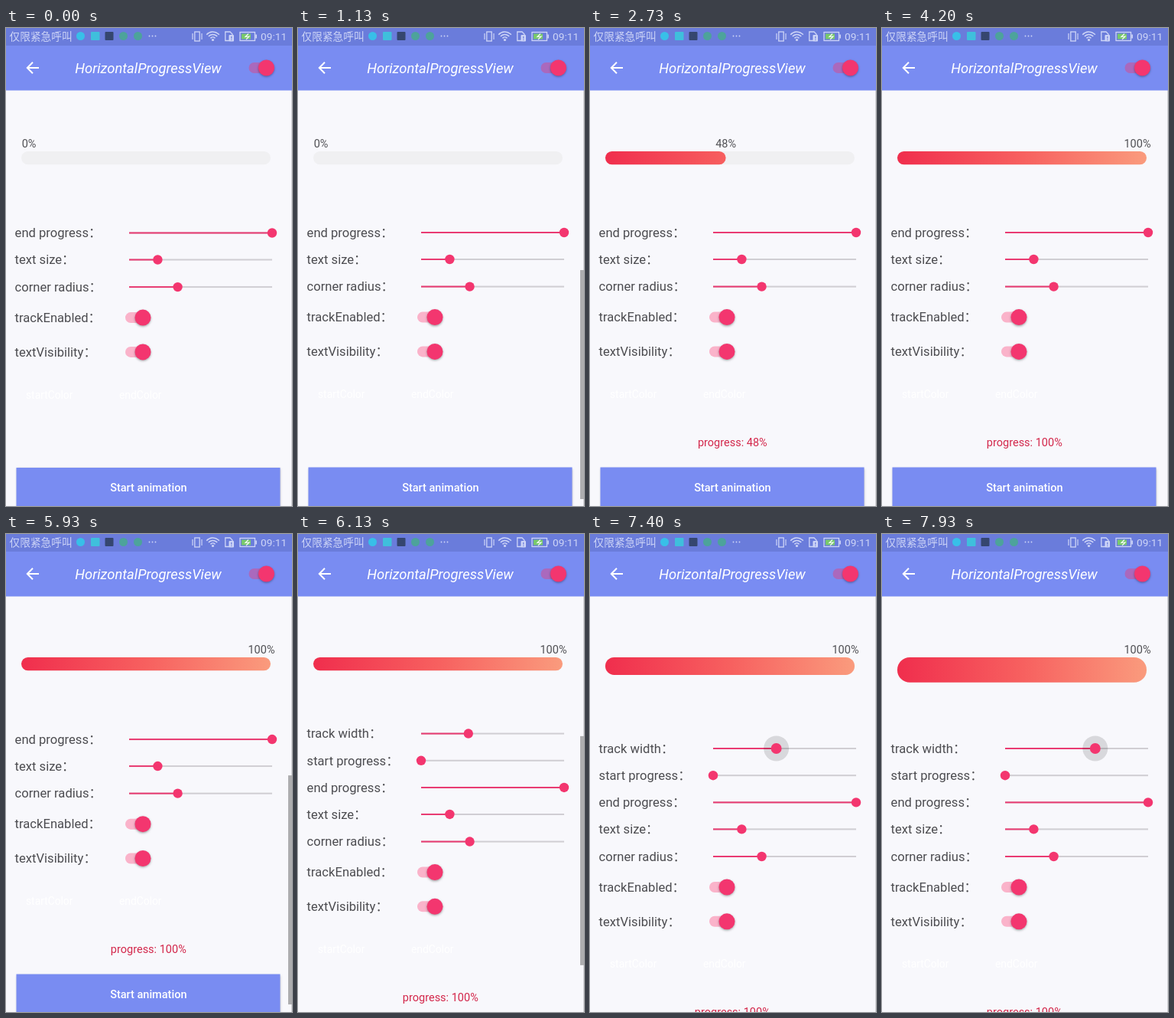
Animation of 374 by 624 pixels, one loop 8000 ms. Source, as an HTML page with a canvas:

```html
<!DOCTYPE html>
<html lang="zh-CN">
<head>
<meta charset="utf-8">
<title>HorizontalProgressView</title>
<style>
html, body { margin: 0; width: 100%; height: 100%; overflow: hidden; background: #f8f8fc; }
canvas { display: block; width: 374px; height: 624px; }
</style>
</head>
<body>
<canvas id="stage"></canvas>
<script>
const W = 374, H = 624, LOOP = 8000;
const PINK = '#f3366f', BLUE = '#798cf2', BG = '#f8f8fc';
const FONT = 'Roboto, "Noto Sans CJK SC", "Noto Sans CJK", sans-serif';
const BAR_X = 20, BAR_W = 326, BAR_Y = 161;
const LINE_X = 161, LINE_W = 187;
const LIST_TOP = 248, MAX_SCROLL = 83.4;

const canvas = document.getElementById('stage');
const ctx = canvas.getContext('2d');
const dpr = window.devicePixelRatio || 1;
canvas.width = W * dpr;
canvas.height = H * dpr;

const clamp = (v, a = 0, b = 1) => Math.min(b, Math.max(a, v));
const span = (t, a, b) => clamp((t - a) / (b - a));
const cosEase = u => 0.5 - 0.5 * Math.cos(Math.PI * u);
const cubicEase = u => u < 0.5 ? 4 * u ** 3 : 1 - 4 * (1 - u) ** 3;

function rect(x, y, w, h, fill) {
  ctx.fillStyle = fill;
  ctx.fillRect(x, y, w, h);
}

function pill(x, y, w, h, fill, r = h / 2) {
  ctx.fillStyle = fill;
  ctx.beginPath();
  ctx.roundRect(x, y, w, h, Math.min(r, w / 2));
  ctx.fill();
}

function dot(x, y, r, fill) {
  ctx.fillStyle = fill;
  ctx.beginPath();
  ctx.arc(x, y, r, 0, Math.PI * 2);
  ctx.fill();
}

function stroke(points, color, width) {
  ctx.strokeStyle = color;
  ctx.lineWidth = width;
  ctx.beginPath();
  points.forEach(([x, y]) => ctx.lineTo(x, y));
  ctx.stroke();
}

function text(s, x, y, size, color, style = '', align = 'left') {
  ctx.font = `${style} ${size}px ${FONT}`;
  ctx.fillStyle = color;
  ctx.textAlign = align;
  ctx.fillText(s, x, y);
}

function withShadow(color, blur, dy, draw) {
  ctx.save();
  ctx.shadowColor = color;
  ctx.shadowBlur = blur * dpr;
  ctx.shadowOffsetY = dy * dpr;
  draw();
  ctx.restore();
}

function toggle(x, y, track) {
  pill(x - 23, y - 7, 32, 14, track);
  withShadow('rgba(0,0,0,.35)', 3, 1.2, () => dot(x, y, 10.5, PINK));
}

function slider(y, frac, halo = 0) {
  const x = LINE_X + LINE_W * frac;
  rect(LINE_X, y - 1, LINE_W, 2, '#d0ced3');
  rect(LINE_X, y - 1, x - LINE_X, 2, '#e93b72');
  if (halo) dot(x, y, 16.5 * halo, 'rgba(0,0,0,.13)');
  dot(x, y, 6.2 + 0.8 * halo, PINK);
}

function statusBar() {
  const ink = '#ced5f7';
  rect(0, 0, W, 23, '#6a7cdb');
  text('仅限紧急呼叫', 4.5, 16, 13.7, ink);
  dot(97.5, 10.5, 5.5, '#38bfe8');
  pill(111, 5, 11.5, 11, '#3fbfdc', 1);
  pill(129.5, 5, 11, 11, '#35466f', 1);
  dot(153.5, 10.5, 5.5, '#4da39b');
  dot(172.5, 10.5, 5.5, '#4da39b');
  for (const x of [187.5, 191.5, 195.5]) dot(x, 10.5, 0.9, ink);

  // vibrate
  ctx.strokeStyle = ink;
  ctx.lineWidth = 1.3;
  ctx.strokeRect(246.8, 5, 6.4, 12);
  stroke([[244, 7], [244, 15]], ink, 1.2);
  stroke([[256, 7], [256, 15]], ink, 1.2);

  // wifi
  for (const r of [4, 7.5, 11]) {
    ctx.beginPath();
    ctx.arc(270.5, 16, r, -Math.PI * 0.77, -Math.PI * 0.23);
    ctx.lineWidth = 1.6;
    ctx.stroke();
  }
  dot(270.5, 15.5, 1.6, ink);

  // sim card
  stroke([[292, 16.5], [286.8, 16.5], [286.8, 5], [293, 5], [296, 8], [296, 9]], ink, 1.3);
  pill(291.5, 9, 6.5, 8.5, ink, 1);
  rect(294.2, 10.8, 1.2, 3, '#6a7cdb');
  rect(294.2, 14.8, 1.2, 1.2, '#6a7cdb');

  // battery
  ctx.strokeRect(306, 5.5, 19.5, 11);
  rect(326.3, 8.5, 1.7, 5, ink);
  rect(308, 7.5, 12, 7, '#78c96b');
  stroke([[317, 7.5], [313, 11.5], [318, 11], [314, 15]], '#f2f7f4', 1.2);
  text('09:11', 333, 16, 13.7, ink);
}

function toolbar() {
  rect(0, 23, W, 58.5, BLUE);
  stroke([[43, 52], [28, 52]], '#fff', 2);
  stroke([[35, 44.8], [27.8, 52], [35, 59.2]], '#fff', 2);
  text('HorizontalProgressView', 186, 59, 18.4, '#fff', 'italic', 'center');
  toggle(340.5, 52, '#aa69bd');
}

function progressBar(p, h) {
  pill(BAR_X, BAR_Y, BAR_W, h, '#f0f0f2');
  if (p > 0) {
    const g = ctx.createLinearGradient(BAR_X, 0, BAR_X + BAR_W, 0);
    g.addColorStop(0, '#f02e4d');
    g.addColorStop(0.5, '#f7605f');
    g.addColorStop(1, '#fa9b7d');
    pill(BAR_X, BAR_Y, BAR_W * p, h, g);
  }
  const label = Math.floor(p * 100) + '%';
  ctx.font = `14.5px ${FONT}`;
  const w = ctx.measureText(label).width;
  const x = clamp(BAR_X + BAR_W * p - w / 2, 20.7, 351.5 - w);
  text(label, x, 156, 14.5, '#505054');
}

function list(s) {
  const ink = '#4c4c50';
  const row = (label, y) => text(label + '：', 11.6, y + 5.8, 16.6, ink);
  const sliders = [
    ['track width', 196.6, s.width],
    ['start progress', 231.8, 0],
    ['end progress', 267, 1],
    ['text size', 302, 0.2],
    ['corner radius', 337.6, 0.34]
  ];
  const switches = [['trackEnabled', 377.6], ['textVisibility', 422.4]];

  ctx.save();
  ctx.beginPath();
  ctx.rect(0, LIST_TOP, W, H - LIST_TOP);
  ctx.clip();
  ctx.translate(0, s.scroll);
  sliders.forEach(([label, y, frac], i) => {
    row(label, y);
    slider(y, frac, i ? 0 : s.halo);
  });
  for (const [label, y] of switches) {
    row(label, y);
    toggle(179, y, '#fab3ca');
  }
  text('startColor', 26, 483, 13.8, '#fff');
  text('endColor', 148, 483, 13.8, '#fff');
  if (s.started) {
    text(`progress: ${Math.floor(s.progress * 100)}%`, 186.3, 546, 14.5, '#d3274b', '', 'center');
  }
  withShadow('rgba(0,0,0,.28)', 3, 1, () => rect(13.5, 573.5, 345, 51, BLUE));
  text('Start animation', 186.3, 604.6, 14.5, '#fff', '500', 'center');
  ctx.restore();

  if (s.thumb > 0) {
    ctx.globalAlpha = s.thumb;
    rect(369, 316 - s.scroll * 0.815, 5, 299, '#adadaf');
    ctx.globalAlpha = 1;
  }
}

function stateAt(t) {
  const firstThumb = t >= 60 ? 1 - span(t, 1250, 1600) : 0;
  const lastThumb = t >= 5870 ? 1 - span(t, 6550, 6790) : 0;
  const x = 222.8 + 56 * cosEase(span(t, 7020, 7930));
  return {
    started: t >= 2146,
    progress: cosEase(span(t, 2146, 3346)),
    scroll: 0.5 * (1 - span(t, 0, 200)) + MAX_SCROLL * cubicEase(span(t, 5870, 6300)),
    thumb: Math.max(firstThumb, lastThumb),
    width: (x - LINE_X) / LINE_W,
    halo: span(t, 6900, 7100)
  };
}

function draw(t) {
  const s = stateAt(t);
  ctx.setTransform(dpr, 0, 0, dpr, 0, 0);
  rect(0, 0, W, H, BG);
  rect(373, 81, 1, H - 81, '#d2d2d6');
  progressBar(s.progress, 52 * s.width);
  list(s);
  statusBar();
  toolbar();
}

const start = performance.now();
function tick() {
  const t = (performance.now() - start) % LOOP;
  // the picture advances 15 times a second
  draw(Math.floor((t + 4) * 0.015) / 0.015);
  requestAnimationFrame(tick);
}
tick();
</script>
</body>
</html>
```
